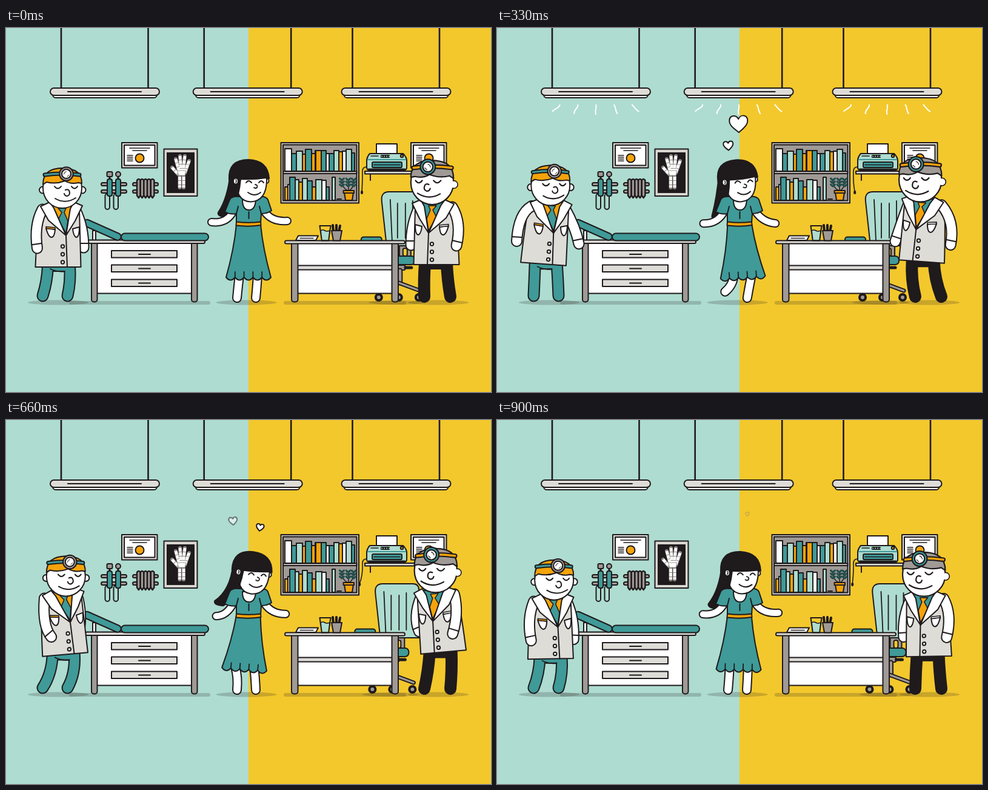
An HTML page with a canvas for the animation above (0.93 s loop, 800 px wide and 600 px high).

```html
<!DOCTYPE html>
<html lang="en">
<head>
<meta charset="utf-8">
<title>Two doctors</title>
<style>
html, body { margin: 0; width: 100%; height: 100%; overflow: hidden; }
canvas { display: block; }
</style>
</head>
<body>
<canvas id="stage" width="800" height="600"></canvas>
<script>
const c = document.getElementById('stage').getContext('2d');
const ink = '#1f1a1c', mint = '#aedcd0', yellow = '#f3c82d', teal = '#3f9a98',
  orange = '#f5a30b', pale = '#dedcd7', gray = '#a09a97', white = '#fff';
const LOOP = 930, STEP = 30;

// Drawing helpers
function draw(shape, fill, line = ink, w = 2) {
  const path = typeof shape === 'string' ? new Path2D(shape) : shape;
  if (fill) { c.fillStyle = fill; c.fill(path); }
  if (line) { c.strokeStyle = line; c.lineWidth = w; c.stroke(path); }
}
function box(x, y, w, h, fill, r = 0, line = ink) {
  const path = new Path2D();
  path.roundRect(x, y, w, h, r);
  draw(path, fill, line);
}
function oval(x, y, rx, ry, fill, line = ink) {
  const path = new Path2D();
  path.ellipse(x, y, rx, ry, 0, 0, 7);
  draw(path, fill, line);
}
const dot = (x, y, r, fill, line) => oval(x, y, r, r, fill, line);
function tube(d, fill, w) {
  draw(d, null, ink, w + 4);
  draw(d, null, fill, w);
}
function at(x, y, deg, px, py, paint, scale = 1) {
  c.save();
  c.translate(x + px, y + py);
  c.rotate(deg * Math.PI / 180);
  c.scale(scale, scale);
  c.translate(-px, -py);
  paint();
  c.restore();
}
const clamp = (v, lo = 0, hi = 1) => Math.min(hi, Math.max(lo, v));

function lamp(x, t) {
  for (const dx of [-72, 71.5]) draw(`M${x + dx} 0V100`, null, ink, 2.6);
  box(x - 86, 104, 172, 11, white, 5);
  box(x - 90, 99, 180, 12, pale, 6);
  draw(`M${x - 61} 105h121`);
  const from = clamp((t - 390) / 260), to = clamp((t - 60) / 200);
  if (to <= from) return;
  c.save();
  c.lineCap = 'butt';
  for (let i = -2; i <= 2; i++) {
    const dx = i * 6, dy = 17 - 1.25 * i * i, len = Math.hypot(dx, dy) + 1;
    c.setLineDash([(to - from) * len, 99]);
    c.lineDashOffset = -from * len;
    draw(`M${x + i * 29.7} 126c${dx * .2 + 3} 6 ${dx * .7 - 3} 8 ${dx} ${dy}`, null, white);
  }
  c.restore();
}

function certificate(x) {
  box(x, 189, 58.5, 41.5, pale);
  box(x + 4, 193, 50.5, 33.5, white);
  draw(`M${x + 13} 198h33M${x + 18} 202h23`, null, ink, 1.6);
  for (let y = 210; y < 220; y += 3) draw(`M${x + 9} ${y}h9`, null, ink, 1.5);
  dot(x + 29.5, 214.5, 7, orange);
}

function xray() {
  box(260.5, 199.5, 55, 77.5, '#d9d5d0');
  box(265, 205, 46, 67, ink, 0, null);
  const bones = 'M274 230L284 241M280 216L286 238M287 211L289 238M295 211L292 238M302 219L295 239M286.500 245V263M293 245V263';
  draw(bones, '', '#8b8685', 6);
  c.save();
  c.lineCap = 'butt';
  c.setLineDash([6, 1]);
  draw(bones, '', white, 4.6);
  c.restore();
  draw('M283 235H297L295 243H285Z', white, gray, 1);
}

function instruments() {
  for (const y of [257.5, 269.5]) {
    box(157, y - 2.5, 42, 5, gray, 2.5);
    box(209, y - 2.5, 42, 5, gray, 2.5);
  }
  for (const x of [171, 185]) {
    box(x - 7.5, 273, 7.5, 26, mint, 4);
    draw(`M${x} 244V250`, null, ink, 3);
    box(x - 4, 249, 8, 28, teal, 3);
  }
  box(166.5, 237, 9, 8, gray, 2);
  dot(185, 241, 4, gray);
  for (let x = 216; x < 244; x += 5.7) draw(`M${x} 251q2.8-4 5.6 0V276l-2.8 4l-2.8-4Z`, gray, ink, 2.4);
}

function couch() {
  box(143, 334, 5, 18, white);
  box(150, 354, 156, 83.5, white);
  for (const x of [141, 306]) box(x, 352, 9.5, 99.5, gray, 4);
  for (const y of [367, 390.5, 414.5]) {
    box(174, y, 108, 11.5, pale);
    draw(`M219 ${y + 6}h19`);
  }
  box(131, 349.5, 197, 5.5, pale, 2.5);
  tube('M133.5 321.5L184 344', teal, 9.5);
  box(190, 338.5, 144, 12, teal, 6);
}

function books(x, base, list) {
  for (const [w, h, fill] of list) {
    box(x, base - h, w, h, fill, 0);
    x += w;
  }
}
function bookcase() {
  box(453.5, 189, 128.5, 99.5, '#cdc8c4');
  box(457, 192.5, 121.5, 92, gray, 0);
  books(460, 236, [[11, 37, white], [8, 29, teal], [10, 33, mint], [5, 28, orange], [10, 36, teal],
    [6, 29, orange], [1, 34, ink], [9, 34, orange], [8, 34, teal], [5, 29, white], [8, 29, teal],
    [8, 34, mint], [6, 32, orange], [6, 33, white], [9, 36, mint], [5, 30, teal]]);
  box(457, 236.5, 121.5, 3.5, pale);
  books(460, 284, [[5, 22, orange], [3, 26, white], [9, 38, teal], [6, 34, mint], [6, 30, orange],
    [8, 36, mint], [8, 32, teal], [6, 22, orange], [10, 34, mint], [7, 33, white], [5, 22, teal]]);
  box(538, 246, 5, 38, mint);
  draw('M546 282h7');
  draw('M565 268V250M564 268Q555 265 554 251M566 268Q573 265 573 252', null, ink, 1.5);
  for (const x of [554, 564.5, 573.5])
    for (let y = 250; y < 263; y += 5) draw(`M${x - 3.5} ${y - 2}l3.5 3l3.5-3`, null, '#214d4b', 3);
  draw('M558 271H573L571 284H560Z', orange);
  box(556.5, 268, 17.5, 4, orange);
}

function printer(s) {
  draw(`M595 229Q588 229 588 236Q${588 + s} 255 ${587 - 4 * s} 270`, null, ink, 1.6);
  draw(`M${587 - 4 * s} 270v2`, null, ink, 4);
  box(592, 236, 88, 4.5, pale);
  draw('M601 241V251');
  box(611, 191, 34, 20, white);
  draw('M600 207H655Q661 213 661 219V230Q661 234 657 234H599Q595 234 595 230V219Q595 213 600 207Z', mint);
  draw('M597 217H659', null, teal);
  box(604, 221, 49, 9, teal, 2);
  draw('M607 225.500H650', null, ink, 1.7);
  draw('M602 211H614', null, ink, 1.5);
  box(618, 209, 15, 5, ink, 1, null);
  for (let x = 620; x < 633; x += 4) dot(x, 211.5, 1, mint, null);
  dot(653, 211, 2.2, orange);
  draw('M598 233H658', null, ink, 3);
}

function chair() {
  oval(645, 452.5, 47, 3.5, 'rgba(30,25,25,.2)', null);
  draw('M632 270H682Q692 270 692 282V359H628L620 286Q618 270 632 270Z', mint);
  draw('M634 283L637 350M646 289V346M659 289V346M671 285V346', null, ink, 1.8);
  box(649, 359, 19, 17, gray);
  box(655, 363, 7, 13, yellow, 3);
  box(625, 376, 50, 14, teal, 6);
  box(643, 391, 16, 8, gray, 3);
  tube('M659 395H669', ink, 1);
  tube('M650 400V420', gray, 5);
  tube('M615 435L648 420L683 433', gray, 3);
  for (const x of [615, 648, 681]) {
    dot(x, 444, 6, ink);
    dot(x, 444, 3, gray, null);
  }
  box(586, 344.5, 34, 10, teal, 4);
}

function desk() {
  box(481, 355, 156, 82.5, white);
  box(481, 391.5, 156, 7, pale);
  for (const x of [471, 636.5]) box(x, 352, 10.5, 99.5, gray, 4);
  box(460, 350.5, 198, 5, pale, 2.5);
  draw('M482 342.5H515L511 350H478Z', white);
  draw('M485 346.5h22', null, ink, 1.5);
  draw('M540 336L539 325M545 336V325M549 336L551 326', null, ink, 4);
  draw('M537 334H554L551 350.5H540Z', gray);
  draw('M517.5 326H535.5L532 350.5H521Z', yellow);
  draw('M519 334q4-2 7 0t8 0L532 350H521Z', mint, ink, 1.6);
}

// Sleeve with cuff, bending from shoulder to hand
function sleeve(x0, y0, cx, cy, x1, y1) {
  tube(`M${x0} ${y0}Q${cx} ${cy} ${x1} ${y1}`, white, 15);
  const len = Math.hypot(x1 - cx, y1 - cy), ux = (x1 - cx) / len, uy = (y1 - cy) / len;
  const px = x1 - 7 * ux, py = y1 - 7 * uy;
  draw(`M${px - 8 * uy} ${py + 8 * ux}L${px + 8 * uy} ${py - 8 * ux}`);
}

function doctor(s, o) {
  const lift = s * s;
  sleeve(115 + 4 * s, 301 - 7 * lift, 128 + o.inner * .2 * s, 328, 128 + o.inner * s, 362 - 10 * lift);

  const hip = 8 * s, hipY = 392 - 6 * lift, [footA, footB] = o.feet;
  tube(`M${69 + hip} ${hipY}Q${68 + hip} 418 ${footA} ${o.floor}M${69 + hip} ${hipY}H${105 + hip}` +
    `Q${107 + hip} 418 ${footB} ${o.floor}`, o.legs, 16);
  if (o.legs !== ink) draw(`M${73 + hip} ${hipY + 5}q12 6 24 4`, null, ink, 1.8);

  const coat = paint => at(12 * s, -8 * lift, -5.2 * s, 85.5, 394, paint);
  coat(() => {
    draw('M66 290L55 300Q51 335 48.5 394H123.5L121 300L112 290Z', pale);
    draw('M99 342L101 394');
    for (const y of [360, 373, 386]) dot(93.5, y, 2.7, white);
    draw('M66 330L81 332Q80 345 75 345Q70 345 66 330Z', white);
    draw('M66 327.5l15 1.5v3l-14-1.5Z', o.pocket, ink, 1.5);
    draw('M110 331L121 328Q121 345 115.5 345Q111 342 110 331Z', white);
  });
  sleeve(60 + 3.5 * s, 299 - 7 * lift + 1.5 * s, ...o.arm(s, lift));
  coat(() => {
    draw('M74 290H112L99 341Z', o.shirt);
    draw('M86 297h13l-3 7l6 14L99 338L86 316l6-12Z', o.tie, ink, 1.5);
    draw('M72 287L57 294L70 317L99 342L79 297Z', white);
    draw('M112 287L126 293L114 318L99 342L106 298Z', white);
  });

  at(6 * s, -7 * lift + o.rise, 0, 93, 297, () => {
    dot(60.5, 267, 5.5, white);
    if (o.ears > 1) dot(126, 267, 5.5, white);
    oval(93, 264, 32, 33, white);
    if (o.ears < 2) dot(60.5, 267, 5, white, null);
    draw('M61 258Q61 231 93 231Q125 231 125 256L119 255Q107 258 97 252Q82 258 67 254Z', o.hair);
    tube('M64 242Q93 238 121 242', o.band, 3);
    dot(99.5, 240.5, 11.3, o.ring);
    dot(99.5, 240.5, 7.5, white);
    draw('M95.5 241q1-4 4-4.5M101 245l3-3', null, ink, 1);
    draw('M80 261q5.5 7 11 0M108 261q5 7 10 0');
    draw('M104 268Q102 265 98 267M104 268Q107 275 101 277Q97 277 96 273');
    draw('M81 281Q98 291 115 280');
  }, o.size);
}

const junior = {
  legs: teal, hair: orange, band: teal, ring: gray, pocket: orange, shirt: orange, tie: teal, ears: 2,
  feet: [60.5, 101.5], floor: 441.5, size: 1, rise: 0, inner: -9,
  arm: (s, lift) => [46 + 14 * s, 325 - 5 * lift + 20 * s, 51.5 + 24 * s, 363 - 11.5 * lift + 5.5 * s]
};
const senior = {
  legs: ink, hair: gray, band: orange, ring: teal, pocket: white, shirt: teal, tie: orange, ears: 1,
  feet: [63, 106], floor: 447, size: 1.1, rise: -2, inner: 14,
  arm: (s, lift) => [44 - 5 * s, 325 - 3 * lift, 53 - 6.5 * s, 363 - 5 * lift + 2 * s]
};

function woman(s) {
  const lift = s * s, kick = Math.max(0, -s);
  const tipX = 350 - 6 * s, tipY = 307 - 6 * s, x = 368 + 4.5 * s;
  draw(`M${x + 2} 238Q${x - 2} 280 ${tipX} ${tipY - 3}Q${tipX - 2} ${tipY + 4} ${tipX + 14} ${tipY + 5}` +
    `Q${x + 8} 294 ${x + 18} 274V240Z`, ink);

  tube(`M${385 - 7 * s} 408Q${383 + 8 * kick} 424 ${381 - 6 * kick} ${445 - 13 * kick}`, white, 12);
  tube(`M${415 - 6 * s} 408Q${414 - 3 * s} 424 ${412 + kick} 445`, white, 12);
  tube(`M375 302Q364 323 ${339 + 5.5 * lift + 2.5 * s} ${320 + 3.5 * lift}`, white, 10);
  tube(`M426 302Q438 320 ${464 - 5 * lift + 2 * s} ${318 + 4 * lift - 2 * s}`, white, 10);

  at(0, 0, 4.6 * s, 400, 322, () => {
    let hem = 'M380 324Q376 365 363 411';
    for (let i = 0; i < 5; i++) hem += 'q7.4 9 14.8 0';
    draw(hem + 'Q424 365 420 324Z', teal);
    for (let i = 1; i < 5; i++) draw(`M${363 + 14.8 * i} 411v-9`, null, ink, 1.8);
  });
  draw('M384 278Q372 277 369 283L361 303Q370 308 380 306L380 322H420L421 306Q431 306 438 301L432 283Q429 277 417 278Z', teal);
  draw('M380 306L383 294M421 306L418 294M400.5 303V314');
  draw('M390 283Q390 300 401 300Q411 300 412 283Z', white);
  draw('M380 319.5Q400 322 420 319.5L420.5 325Q400 328 379.5 325.5Z', orange);

  at(0, 0, 6 * s, 402, 295, () => {
    dot(429.5, 252, 4, white);
    draw('M379 245Q378 286 404 286.5Q429 285 430 252V240H379Z', white);
    draw('M368 250Q366 217 400 217Q432 218 434 248L429 247Q410 250 387 249Q386 262 383 274L374 272Z', ink);
    oval(379, 252.5, 4, 5, white);
    draw('M379 250q2 2 0 5', null, ink, 1.4);
    draw('M396 255q4-6 9 0M417 255q4-6 8 0');
    draw('M411 258q5 1 3 5q-2 2-5 0', null, ink, 1.8);
    draw('M399 271Q410 279 420 271');
  });
}

// Keys: time, x, y, width, tilt, opacity
const hearts = [
  [[60, 388, 186, 0, 20, 1], [180, 393, 173, 30, 10, 1], [330, 398.5, 158, 30, -2, 1],
    [450, 403, 146, 30, -10, 1], [570, 400, 138, 19, 0, .25], [630, 398, 134, 12, 0, 0]],
  [[270, 385, 200, 0, 0, 1], [330, 381.5, 194, 16, -4, 1], [450, 377, 184, 17, 0, 1],
    [570, 369, 174, 17.5, -12, 1], [750, 380, 159, 10, 0, .08], [780, 381, 157, 8, 0, 0]],
  [[390, 407, 203, 0, 0, 1], [450, 409, 197, 9, 0, 1], [570, 411, 184, 12.5, 0, 1],
    [750, 427, 170, 12.5, 20, 1], [900, 413, 155, 6, 0, .15], [930, 411, 152, 4, 0, 0]]
];
function heart(keys, t) {
  const i = keys.findIndex(key => key[0] > t);
  if (i < 1) return;
  const a = keys[i - 1], b = keys[i], f = (t - a[0]) / (b[0] - a[0]);
  const [, x, y, w, tilt, alpha] = a.map((v, n) => v + (b[n] - v) * f);
  if (w < 1) return;
  c.save();
  c.globalAlpha = alpha;
  c.translate(x, y);
  c.rotate(tilt * Math.PI / 180);
  c.scale(w, w);
  draw('M0 .47C-.2 .3-.5 .1-.5-.17C-.5-.52-.1-.52 0-.26C.1-.52 .5-.52 .5-.17C.5 .1 .2 .3 0 .47Z', white, ink, 2 / w);
  c.restore();
}

function frame(now) {
  let t = Math.floor(now % LOOP / STEP) * STEP;
  if (t < 2 * STEP) t = 0;
  const turn = t / LOOP * 2 * Math.PI, s = -Math.sin(turn);
  const roll = -6 - 6 * clamp(1.3 * (Math.cos(turn - 3.243) + .25), -1, 1);

  c.lineCap = c.lineJoin = 'round';
  c.fillStyle = mint;
  c.fillRect(0, 0, 400, 600);
  c.fillStyle = yellow;
  c.fillRect(400, 0, 400, 600);

  const shade = 'rgba(30,25,25,.2)';
  for (const x of [86, 396.5, 713]) oval(x, 452.5, 50, 4, shade, null);
  box(104, 450, 233, 6, shade, 3, null);
  box(458, 450, 202, 6, shade, 3, null);

  for (const x of [163, 398.7, 643.5]) lamp(x, t);
  certificate(191);
  certificate(668);
  xray();
  instruments();
  bookcase();
  printer(s);
  couch();
  at(roll, 0, 0, 0, 0, chair);
  desk();
  doctor(s, junior);
  c.save();
  c.translate(796, -4);
  c.scale(-1, 1);
  doctor(-s, senior);
  c.restore();
  woman(s);
  for (const keys of hearts) heart(keys, t);
  requestAnimationFrame(frame);
}
requestAnimationFrame(frame);
</script>
</body>
</html>
```
